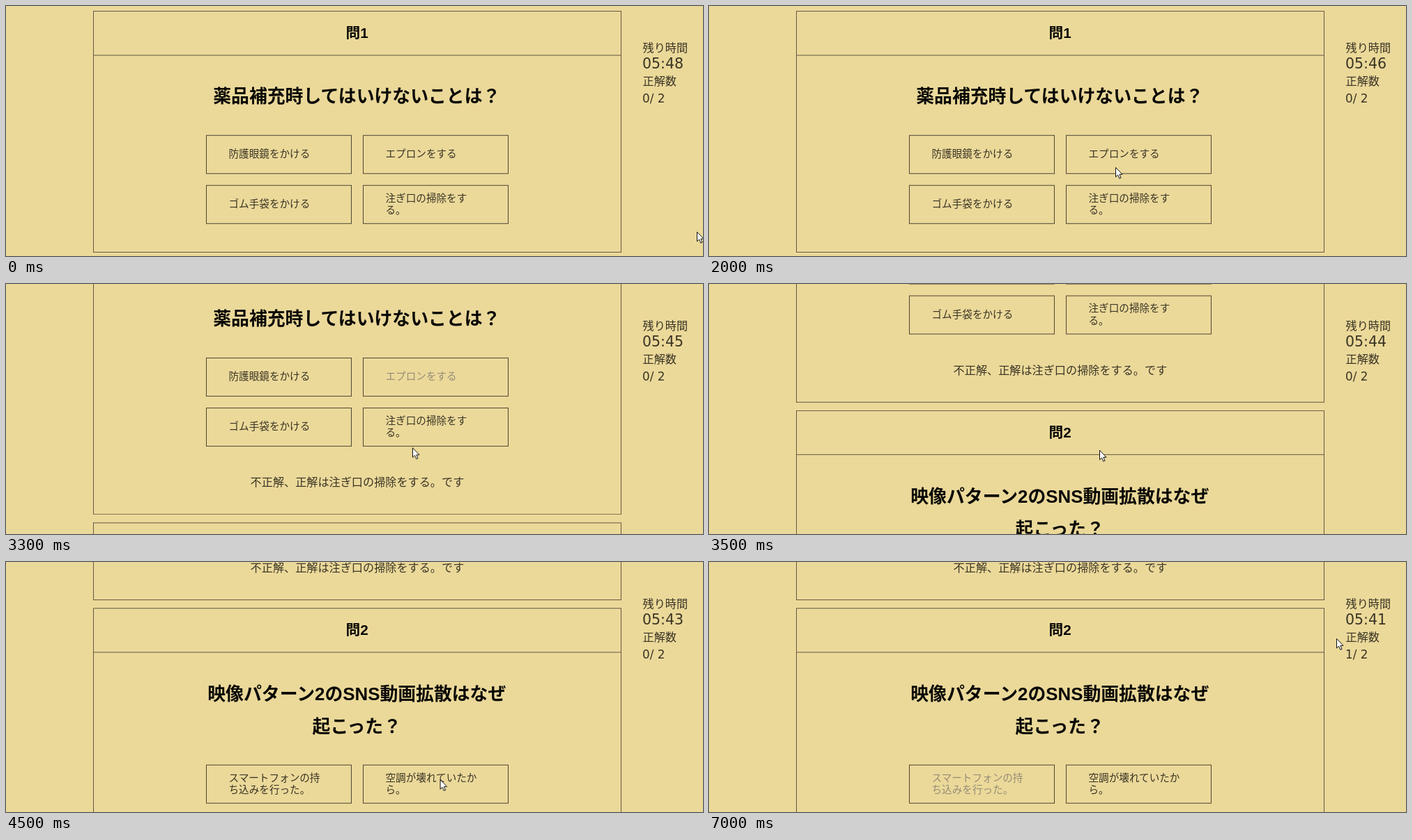
An HTML page that plays this animation: 1000x360 px, repeating every 7100 ms.

```html
<!DOCTYPE html>
<html lang="ja">
<head>
<meta charset="utf-8">
<title>クイズ</title>
<style>
html, body { margin: 0; width: 100%; height: 100%; overflow: hidden; background: #ebd99a; }
svg { display: block; width: 1000px; height: 360px; overflow: hidden; }
text { font: 14.6px "Noto Sans CJK JP", "Noto Sans CJK", sans-serif; fill: #3a3424; }
.line { fill: none; stroke: #615940; stroke-width: 1; }
.option { fill: none; stroke: #4d4632; stroke-width: 1; width: 208px; height: 55px; }
.head, .title { font-family: "Liberation Sans", "Noto Sans CJK JP", "Noto Sans CJK", sans-serif; font-weight: 700; text-anchor: middle; fill: #0a0905; }
.head { font-size: 20.7px; }
.title { font-size: 25.85px; }
.note { font-size: 16.15px; }
.num { font-family: "DejaVu Sans", sans-serif; font-size: 16.8px; }
#clock { font-size: 20.5px; }

#page, #first, #second, #reply, #pick1, #pick2, #cursor {
  animation: 7.1s linear infinite;
}
#page { animation-name: scroll; }
#first { animation-name: grow; }
#second { animation-name: push; }
#reply { animation-name: reveal; }
#pick1 { animation-name: fade1; }
#pick2 { animation-name: fade2; }
#cursor { animation-name: point; }

@keyframes scroll {
  0%, 43.66% { transform: translateY(0); }
  46.48% { transform: translateY(-79px); }
  49.3% { transform: translateY(-241px); }
  52.11% { transform: translateY(-322px); }
  54.93%, 100% { transform: translateY(-357px); }
}
/* first answer: the card grows and pushes the next one down */
@keyframes grow {
  0%, 36.05% { height: 347px; }
  36.06%, 100% { height: 404px; }
}
@keyframes push {
  0%, 36.05% { transform: translateY(-57px); }
  36.06%, 100% { transform: translateY(0); }
}
@keyframes reveal {
  0%, 36.05% { opacity: 0; }
  36.06%, 100% { opacity: 1; }
}
@keyframes fade1 {
  0%, 36.05% { fill: #3a3424; }
  36.06%, 100% { fill: #968d76; }
}
@keyframes fade2 {
  0%, 71.82% { fill: #3a3424; }
  71.83%, 100% { fill: #968d76; }
}
@keyframes point {
  0% { transform: translate(991px, 325px); }
  11.27% { transform: translate(984px, 271px); }
  16.9% { transform: translate(850px, 250px); }
  22.54% { transform: translate(640px, 262px); }
  24.65% { transform: translate(598px, 278px); }
  28.17% { transform: translate(583px, 232px); }
  30.99%, 46.48% { transform: translate(583px, 235.5px); }
  49.3% { transform: translate(560px, 239px); }
  53.52% { transform: translate(560px, 262px); }
  60.56% { transform: translate(640px, 318px); }
  63.38% { transform: translate(623px, 313px); }
  70.42%, 74.65% { transform: translate(400px, 322px); }
  80.28% { transform: translate(964px, 181px); }
  87.32% { transform: translate(984px, 172px); }
  94.37% { transform: translate(975px, 168px); }
  97.18% { transform: translate(955px, 150px); }
  98.59%, 100% { transform: translate(900px, 110px); }
}
</style>
</head>
<body>
<svg viewBox="0 0 1000 360">
  <g id="page">
    <rect id="first" class="line" x="125.5" y="7.5" width="757" height="347"/>
    <path class="line" d="M125 71H883"/>
    <text class="head" x="503.7" y="46">問1</text>
    <text class="title" x="503.3" y="139">薬品補充時してはいけないことは？</text>
    <rect class="option" x="287.5" y="186.3"/>
    <rect class="option" x="512.5" y="186.3"/>
    <rect class="option" x="287.5" y="258.3"/>
    <rect class="option" x="512.5" y="258.3"/>
    <text x="319.5" y="218">防護眼鏡をかける</text>
    <text id="pick1" x="544.5" y="218">エプロンをする</text>
    <text x="319.5" y="290">ゴム手袋をかける</text>
    <text x="544.5" y="281.5">注ぎ口の掃除をす<tspan x="544.5" dy="17.5">る。</tspan></text>
    <text id="reply" class="note" x="350.6" y="371">不正解、正解は注ぎ口の掃除をする。です</text>

    <g id="second">
      <rect class="line" x="125.5" y="423.7" width="757" height="404"/>
      <path class="line" d="M125 487H883"/>
      <text class="head" x="503.7" y="462">問2</text>
      <text class="title" x="503.3" y="556">映像パターン2のSNS動画拡散はなぜ</text>
      <text class="title" x="503.3" y="603">起こった？</text>
      <rect class="option" x="287.5" y="649.3"/>
      <rect class="option" x="512.5" y="649.3"/>
      <text id="pick2" x="319.5" y="672.5">スマートフォンの持<tspan x="319.5" dy="17.5">ち込みを行った。</tspan></text>
      <text x="544.5" y="672.5">空調が壊れていたか<tspan x="544.5" dy="17.5">ら。</tspan></text>
    </g>
  </g>

  <text class="note" x="913.5" y="66">残り時間</text>
  <text id="clock" class="num" x="913" y="90.3">05:48</text>
  <text class="note" x="913.5" y="114">正解数</text>
  <text id="score" class="num" x="913" y="138.7">0/ 2</text>

  <path id="cursor" d="M.5 .5V14L3.6 11.2 5.8 16.3 8 15.4 5.9 10.4H10Z" fill="#fff" stroke="#111" stroke-width="1" stroke-linejoin="round"/>
</svg>
<script>
const LOOP = 7100, SECOND_ANSWER = 5100, TICK_SHIFT = 540;
const clock = document.getElementById('clock');
const score = document.getElementById('score');
let start;

function setText(node, value) {
  if (node.textContent !== value) node.textContent = value;
}

function draw(now) {
  start ??= now;
  const t = (now - start) % LOOP;
  setText(clock, '05:' + (48 - Math.floor((t + TICK_SHIFT) / 1000)));
  setText(score, (t < SECOND_ANSWER ? 0 : 1) + '/ 2');
  requestAnimationFrame(draw);
}
requestAnimationFrame(draw);
</script>
</body>
</html>
```
